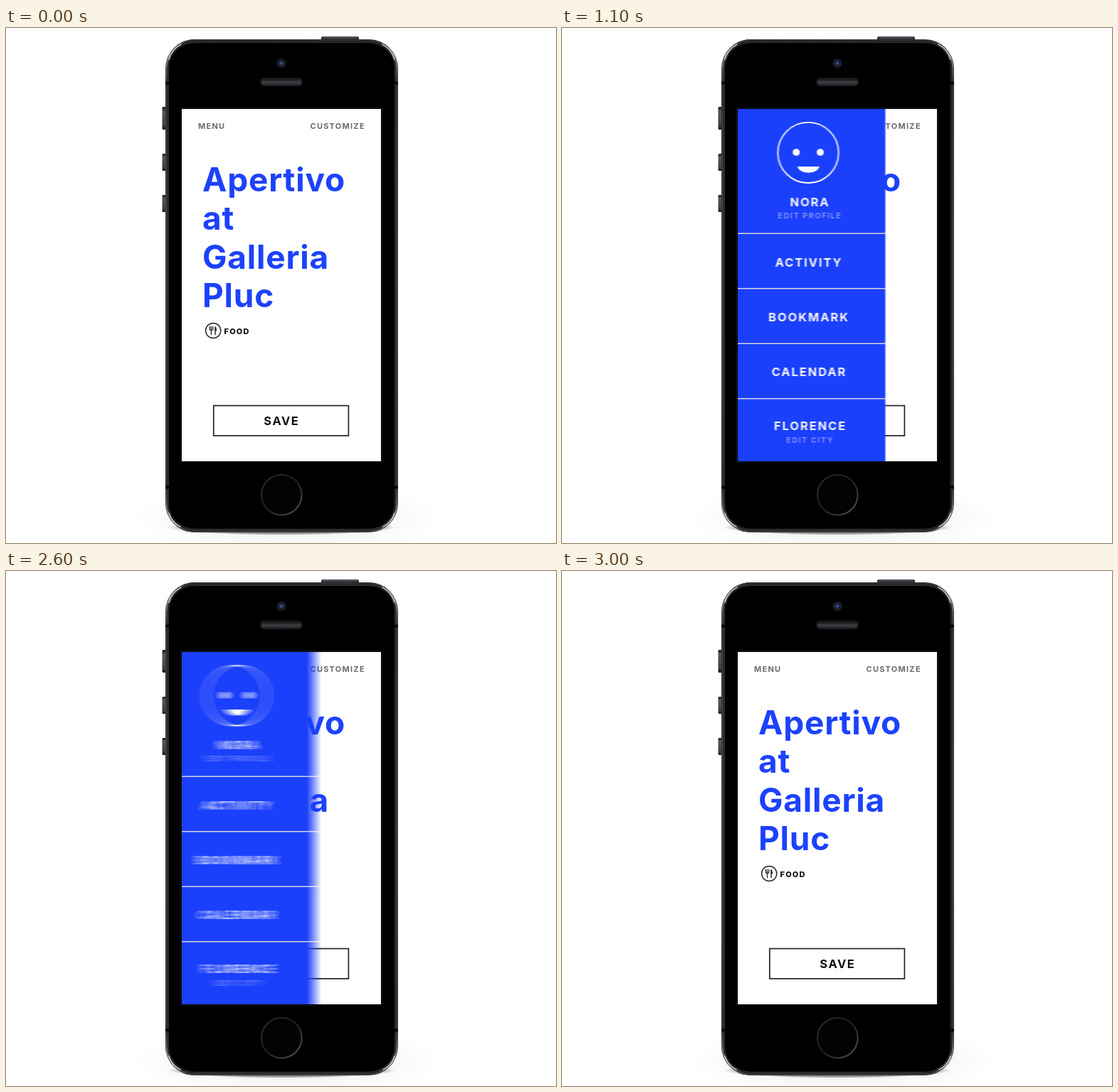
An HTML page that plays this animation: 773x725 px, repeating every 3500 ms.

```html
<!DOCTYPE html>
<html lang="en">
<head>
<meta charset="utf-8">
<title>Sliding menu</title>
<style>
  html, body { margin: 0; width: 100%; height: 100%; overflow: hidden; background: #fff; }
  svg { display: block; width: 773px; height: 725px; }
  text { font-family: Inter, "Open Sans", sans-serif; font-weight: 700; font-optical-sizing: none; }
  .title { font-size: 46px; letter-spacing: .8px; fill: #1c42fc; }
  .nav { font-size: 11px; letter-spacing: 1.25px; fill: #6c6c6c; }
  .tag { font-size: 11px; font-weight: 800; letter-spacing: 1.2px; fill: #111; }
  .save { font-size: 16.5px; letter-spacing: 1.5px; fill: #111; text-anchor: middle; }
  .item { font-size: 16.5px; letter-spacing: 1.9px; fill: #fff; text-anchor: middle; }
  .sub { font-size: 11px; letter-spacing: 1.4px; fill: #8397fc; text-anchor: middle; }
</style>
</head>
<body>
<svg viewBox="0 0 773 725" xmlns="http://www.w3.org/2000/svg">
  <defs>
    <clipPath id="glass"><rect x="247" y="114" width="280" height="496"/></clipPath>
    <linearGradient id="rim" x1="0" y1="0" x2="0" y2="1">
      <stop offset="0" stop-color="#303036"/>
      <stop offset=".03" stop-color="#85858c"/>
      <stop offset=".09" stop-color="#3a3a41"/>
      <stop offset=".5" stop-color="#4a4a52"/>
      <stop offset=".91" stop-color="#3a3a41"/>
      <stop offset=".975" stop-color="#8c8c93"/>
      <stop offset="1" stop-color="#3c3c43"/>
    </linearGradient>
    <linearGradient id="key" x1="0" y1="0" x2="0" y2="1">
      <stop offset="0" stop-color="#17171a"/>
      <stop offset=".2" stop-color="#56565d"/>
      <stop offset=".8" stop-color="#414148"/>
      <stop offset="1" stop-color="#131316"/>
    </linearGradient>
    <linearGradient id="grille" x1="0" y1="0" x2="0" y2="1">
      <stop offset="0" stop-color="#141416"/>
      <stop offset=".5" stop-color="#3e3e45"/>
      <stop offset="1" stop-color="#26262a"/>
    </linearGradient>
    <linearGradient id="home" x1="0" y1="0" x2="1" y2="1">
      <stop offset="0" stop-color="#2c2c2e"/>
      <stop offset=".5" stop-color="#1d1d1f"/>
      <stop offset="1" stop-color="#555558"/>
    </linearGradient>
    <radialGradient id="lens">
      <stop offset="0" stop-color="#4a62b8"/>
      <stop offset=".4" stop-color="#202c5c"/>
      <stop offset=".65" stop-color="#15161f"/>
      <stop offset="1" stop-color="#2b2b31"/>
    </radialGradient>
    <radialGradient id="floor">
      <stop offset="0" stop-color="#000" stop-opacity=".07"/>
      <stop offset=".7" stop-color="#000" stop-opacity=".025"/>
      <stop offset="1" stop-color="#000" stop-opacity="0"/>
    </radialGradient>
    <radialGradient id="contact">
      <stop offset="0" stop-color="#000" stop-opacity=".6"/>
      <stop offset=".8" stop-color="#000" stop-opacity=".4"/>
      <stop offset="1" stop-color="#000" stop-opacity="0"/>
    </radialGradient>

    <g id="page">
      <rect x="247" y="114" width="280" height="496" fill="#fff"/>
      <text class="nav" x="270" y="142">MENU</text>
      <text class="nav" x="427.5" y="142">CUSTOMIZE</text>
      <text class="title" x="276" y="230">Apertivo</text>
      <text class="title" x="276" y="284">at</text>
      <text class="title" x="276" y="339">Galleria</text>
      <text class="title" x="276" y="393">Pluc</text>
      <circle cx="291.2" cy="426" r="10.6" fill="none" stroke="#2a2a2a" stroke-width="1.5"/>
      <path d="M286.3 420v4q0 1.500 2.200 1.500t2.200-1.500v-4M288.500 420v12.300" fill="none" stroke="#222" stroke-width="1.300"/>
      <path d="M293.300 432.300v-12.300q3 .5 2.700 6.500h-1.300v5.800z" fill="#222"/>
      <text class="tag" x="306.500" y="431">FOOD</text>
      <rect x="291.800" y="531.600" width="189.600" height="42.300" fill="none" stroke="#222" stroke-width="1.700"/>
      <text class="save" x="387.300" y="559">SAVE</text>
    </g>

    <g id="menu">
      <rect x="240" y="114" width="220.400" height="496" fill="#1b40fb"/>
      <path d="M240 289.300h220.400M240 366.700h220.400M240 444.200h220.400M240 521.700h220.400" stroke="#d3d6e6" stroke-width="1.500"/>
      <circle cx="352" cy="175.600" r="42.700" fill="none" stroke="#fff" stroke-width="1.900"/>
      <circle cx="335.200" cy="175" r="5" fill="#fff"/>
      <circle cx="369" cy="175" r="5" fill="#fff"/>
      <path d="M336.800 195h31c-2 6-8 8.700-15.500 8.700s-13.500-2.700-15.500-8.700z" fill="#fff"/>
      <text class="item" x="354.500" y="250.500">NORA</text>
      <text class="sub" x="354.300" y="268.300">EDIT PROFILE</text>
      <text class="item" x="353" y="336">ACTIVITY</text>
      <text class="item" x="353" y="412.500">BOOKMARK</text>
      <text class="item" x="353.400" y="490">CALENDAR</text>
      <text class="item" x="355" y="566">FLORENCE</text>
      <text class="sub" x="354.600" y="583.500">EDIT CITY</text>
    </g>
  </defs>

  <ellipse cx="396" cy="690" rx="218" ry="52" fill="url(#floor)"/>
  <ellipse cx="387.500" cy="703" rx="160" ry="11" fill="url(#contact)"/>

  <rect x="443" y="12" width="53" height="8" rx="2" fill="#33333a"/>
  <path d="M446 13.500h47" stroke="#62626a"/>
  <rect x="219.500" y="111" width="6" height="32" rx="1.500" fill="url(#key)"/>
  <rect x="219.500" y="177" width="6" height="24" rx="1.500" fill="url(#key)"/>
  <rect x="219.500" y="235" width="6" height="24" rx="1.500" fill="url(#key)"/>

  <rect x="224" y="16" width="327" height="694" rx="41" fill="#1d1d21"/>
  <rect x="225.500" y="17.500" width="324" height="691" rx="39.500" fill="none" stroke="url(#rim)" stroke-width="2.200"/>
  <rect x="228.500" y="20.500" width="318" height="685" rx="36.500" fill="#000" stroke="#45454c" stroke-width=".7"/>
  <g fill="none" stroke="#dcdce0" stroke-width="1.600" stroke-linecap="round" opacity=".8">
    <path d="M229 44q4-14 17-21M546 44q-4-14-17-21M229 683q4 13 16 19M546 683q-4 13-16 19"/>
  </g>
  <path d="M224 77.500h5M546 77.500h5M224 646.500h5M546 646.500h5" stroke="#08080a" stroke-width="4"/>

  <circle cx="387" cy="49.500" r="6.300" fill="url(#lens)"/>
  <rect x="357" y="70" width="60" height="12" rx="6" fill="#1b1b1e"/>
  <rect x="359" y="72" width="56" height="8.500" rx="4.200" fill="url(#grille)"/>
  <circle cx="387.300" cy="657.300" r="28.300" fill="#030303" stroke="url(#home)" stroke-width="2.200"/>
  <rect x="245.500" y="112.500" width="283" height="499" fill="none" stroke="#17171a"/>

  <g id="screen" clip-path="url(#glass)"></g>
</svg>
<script>
  const LOOP = 3500, STEP = 100, SHUTTER = 50, SAMPLES = 16;
  const OPEN = 800, OPENED = 1300, CLOSE = 2500, CLOSED = 3000, WIDTH = 214;
  const NS = "http://www.w3.org/2000/svg";
  const screen = document.getElementById("screen");

  function add(parent, tag, attrs) {
    const el = document.createElementNS(NS, tag);
    for (const key in attrs) el.setAttribute(key, attrs[key]);
    return parent.appendChild(el);
  }

  // Stacked opacities of 1, 1/2, 1/3... give an even average: motion blur.
  const layers = Array.from({ length: SAMPLES }, (_, i) => {
    const layer = add(screen, "g", { opacity: 1 / (i + 1) });
    add(layer, "use", { href: "#page" });
    return { layer, menu: add(layer, "use", { href: "#menu" }) };
  });

  function opening(t) {
    return -128 * Math.exp((OPEN - t) / 106);
  }

  function closing(t) {
    const p = Math.min(1, Math.max(0, (t - CLOSE - 5) / 540));
    return -213 * p * p * (3 - 2 * p);
  }

  let shown = -1;

  function draw(time) {
    const t = Math.floor((time % LOOP) / STEP) * STEP;
    if (t === shown) return;
    shown = t;
    const moving = (t >= OPEN && t < OPENED) || (t >= CLOSE && t < CLOSED);
    const rest = t >= OPENED && t < CLOSE ? 0 : -WIDTH - 10;
    const path = t < OPENED ? opening : closing;
    layers.forEach(({ layer, menu }, i) => {
      const x = moving ? path(t + SHUTTER * (i + .5) / SAMPLES) : rest;
      menu.setAttribute("transform", `translate(${x.toFixed(2)})`);
      layer.setAttribute("display", moving || i === 0 ? "inline" : "none");
    });
  }

  const start = performance.now();
  function tick() {
    draw(performance.now() - start);
    requestAnimationFrame(tick);
  }
  tick();
</script>
</body>
</html>
```
